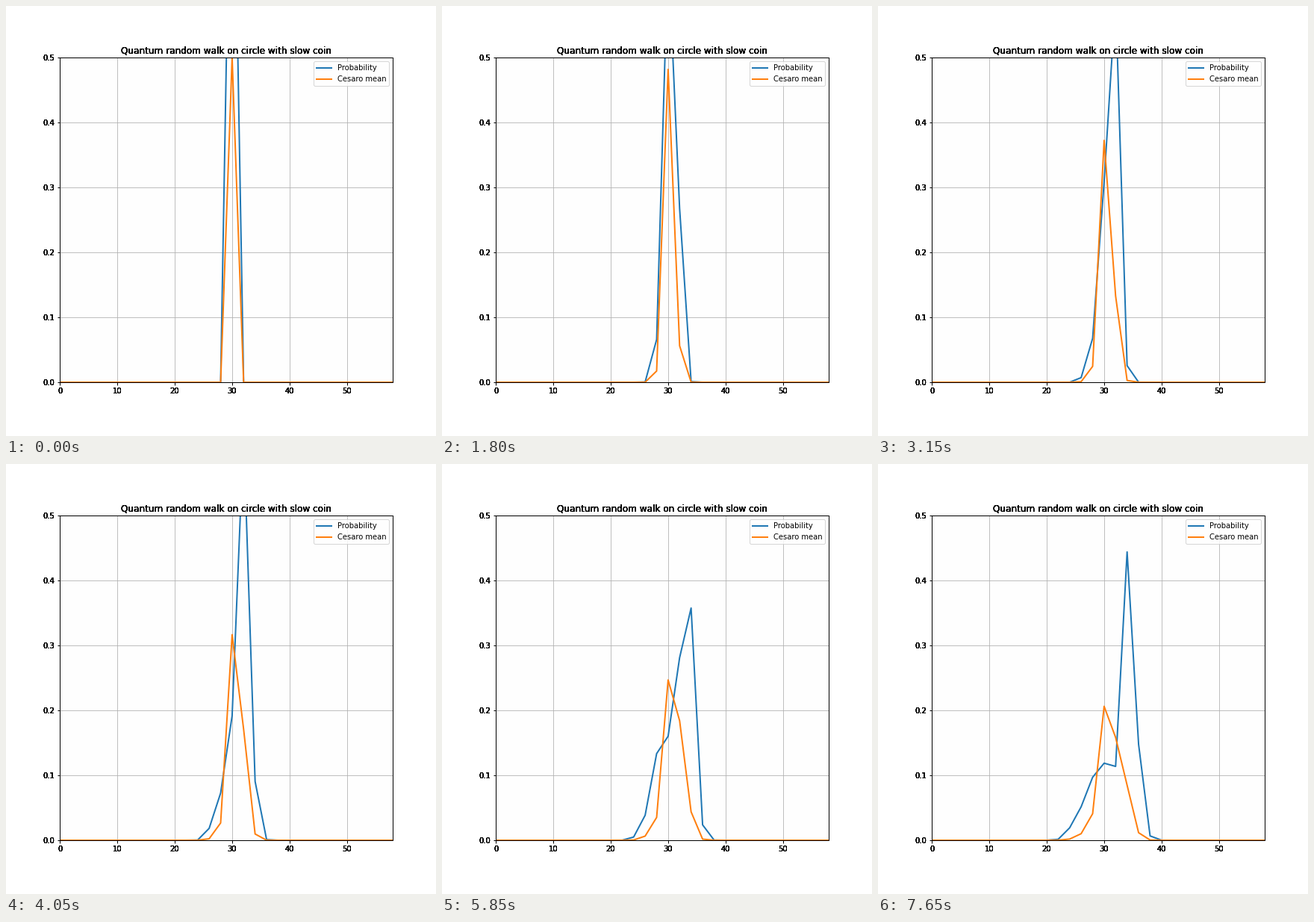
A matplotlib script that plays this animation: 576x576 px, repeating every 8000 ms.

```python
import numpy as np
import matplotlib.pyplot as plt
from matplotlib.animation import FuncAnimation

SITES, START, SHOWN = 60, 30, 18
TICK_MS, HOLD_MS, LOOP_MS = 50, 450, 8000

# Slow coin: mostly reflecting, with a small chance to pass.
PASS = 0.159
FLIP = np.sqrt(1 - PASS**2)
PHASE = np.arccos(0.846)


def step(left, right):
    return (np.roll(PASS * left + FLIP * right, -1),
            np.roll(FLIP * left - PASS * right, 1))


def walk():
    left = np.zeros(SITES, complex)
    right = np.zeros(SITES, complex)
    left[START] = np.sqrt(0.5)
    right[START] = -np.sqrt(0.5) * np.exp(1j * PHASE)
    probs, means, total = [], [], np.zeros(SITES)
    for t in range(2 * SHOWN):
        prob = abs(left)**2 + abs(right)**2
        total = total + prob
        if t % 2 == 0:
            probs.append(prob[::2])
            means.append(total[::2] / max(t + 1, 2))
        left, right = step(left, right)
    return probs, means


probs, means = walk()
x = np.arange(0, SITES, 2)

plt.rcParams.update({"font.family": "DejaVu Sans", "font.size": 10})
fig = plt.figure(figsize=(8, 8), dpi=72, facecolor="white")
fig.subplots_adjust(left=0.125, right=0.9, bottom=0.125, top=0.88)
ax = fig.add_subplot(facecolor="#fefefe")
ax.set(xlim=(0, 58), ylim=(0, 0.5))
ax.grid(True)
ax.tick_params(width=1, labelbottom=False, labelleft=False)
for spine in ax.spines.values():
    spine.set_linewidth(1)

prob_line, = ax.plot(x, probs[0], lw=2, label="Probability")
mean_line, = ax.plot(x, means[0], lw=2, label="Cesaro mean")
ax.legend(loc="upper right")


def heavy(text, xy, offset, ha, va, size=10, coords="data"):
    """Overprint a label so that its soft edges turn dark."""
    for _ in range(6):
        ax.annotate(text, xy, xytext=offset, xycoords=coords,
                    textcoords="offset points", ha=ha, va=va,
                    fontsize=size, annotation_clip=False)


for v in range(0, 60, 10):
    heavy(str(v), (v, 0), (0, -7), "center", "top")
for v in range(6):
    heavy(f"{v / 10:.1f}", (0, v / 10), (-7, 0), "right", "center_baseline")
heavy("Quantum random walk on circle with slow coin", (0.5, 1), (0, 6),
      "center", "baseline", 12, "axes fraction")


def update(i):
    k = min(i * TICK_MS // HOLD_MS, SHOWN - 1)
    prob_line.set_ydata(probs[k])
    mean_line.set_ydata(means[k])
    return prob_line, mean_line


anim = FuncAnimation(fig, update, frames=LOOP_MS // TICK_MS,
                     interval=TICK_MS, repeat=True, repeat_delay=0)
plt.show()
```
